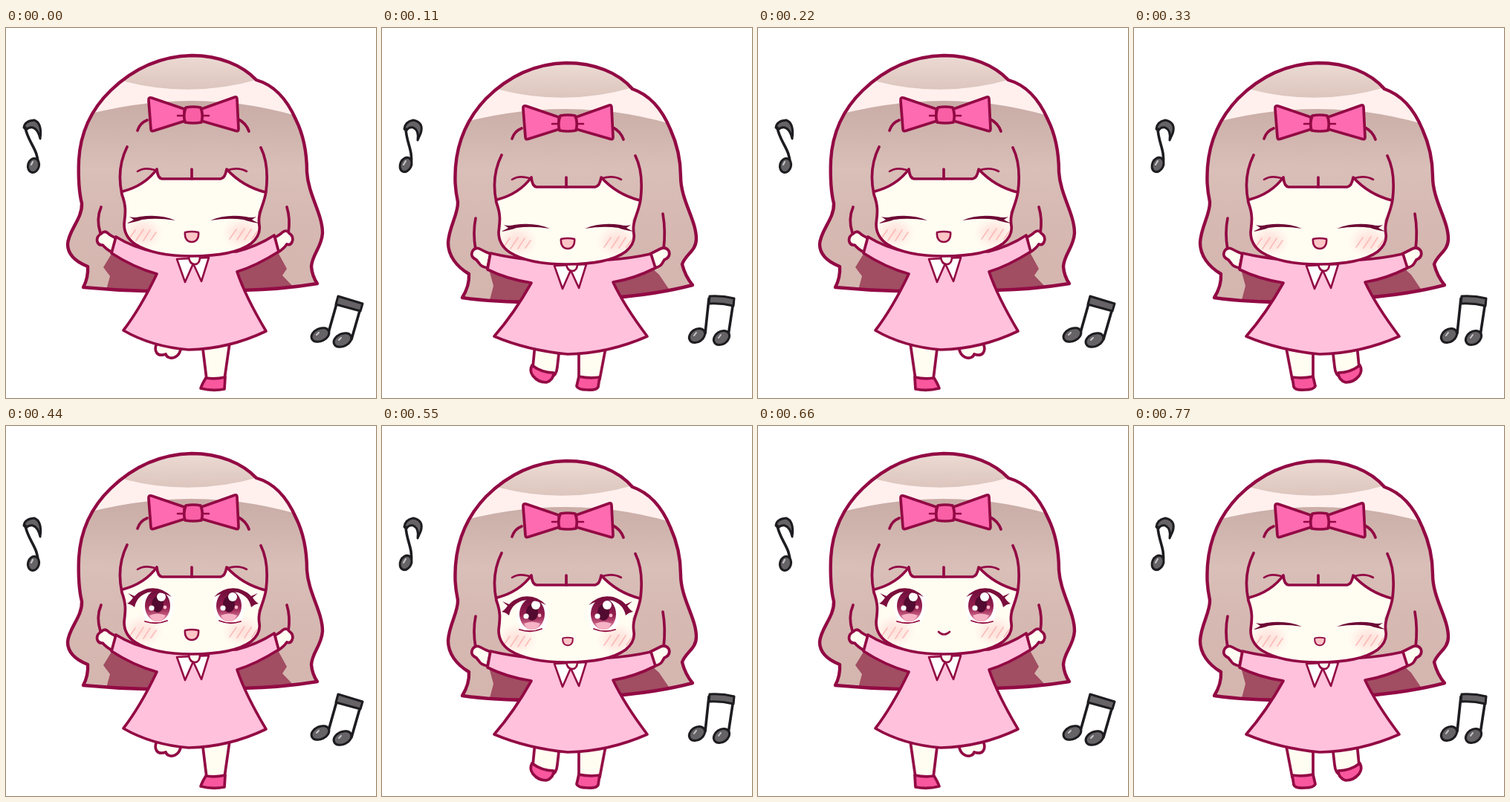
Write an HTML page that moves like this. It is 498x498 px and loops after 880 ms.

```html
<!DOCTYPE html>
<html lang="en">
<head>
<meta charset="utf-8">
<title>Dancing girl</title>
<style>
  html, body { margin: 0; width: 100%; height: 100%; overflow: hidden; background: #fff; }
  svg { display: block; width: 100%; height: 100%; }
  .line { fill: none; stroke: #920a44; stroke-width: 3.7; stroke-linecap: round; stroke-linejoin: round; }
  .outer { stroke-width: 4.4; }
  .thin { stroke-width: 2.6; }
  .skin { fill: #fffdf2; }
  .dress { fill: #ffc1dc; }
  .shoe { fill: #f9589e; }
  .bow { fill: #ff6bb0; }
  .shade { fill: #a14d62; }
  .note { fill: #666367; stroke: #1d1c20; stroke-width: 3; stroke-linecap: round; stroke-linejoin: round; }
  .note .stem { fill: none; stroke-width: 3.6; }
  .note .shine { fill: none; stroke: #c9c6c9; stroke-width: 2; }

  .up, .down { animation: beat 220ms step-end infinite; }
  .down { animation-delay: -110ms; }
  .legs { animation: swap 440ms step-end infinite; }
  .head { animation: bob 220ms step-end infinite; }
  .mouth { animation: mouth-bob 220ms step-end infinite; }
  .awake { animation: awake 880ms step-end infinite; }
  .asleep { animation: asleep 880ms step-end infinite; }
  .smile { animation: smile 880ms step-end infinite; }
  .laugh { fill: #ffc5c6; transform-origin: 250px 281px; animation: laugh 880ms step-end infinite; }

  @keyframes beat { 0% { opacity: 1 } 50%, 100% { opacity: 0 } }
  @keyframes bob { 0% { transform: none } 50%, 100% { transform: translate(-2px, 11px) } }
  @keyframes mouth-bob { 0% { transform: none } 50%, 100% { transform: translate(2px, -2px) } }
  @keyframes swap {
    0%, 75%, 100% { transform: none }
    25% { transform: translate(506px, 0) scaleX(-1) }
  }
  @keyframes awake { 0%, 87.5%, 100% { opacity: 0 } 50% { opacity: 1 } }
  @keyframes asleep { 0%, 87.5%, 100% { opacity: 1 } 50% { opacity: 0 } }
  @keyframes smile { 0%, 87.5%, 100% { opacity: 0 } 75% { opacity: 1 } }
  @keyframes laugh {
    0% { opacity: 1; transform: none }
    62.5%, 87.5%, 100% { opacity: 1; transform: scale(.75) }
    75% { opacity: 0; transform: scale(.75) }
  }
</style>
</head>
<body>
<svg viewBox="0 0 498 498">
  <defs>
    <linearGradient id="hair" gradientUnits="userSpaceOnUse" x1="0" y1="98" x2="0" y2="355">
      <stop offset="0" stop-color="#c8aca5"/><stop offset=".36" stop-color="#d9bfb8"/>
      <stop offset=".6" stop-color="#d6b9b2"/><stop offset="1" stop-color="#d4b6af"/>
    </linearGradient>
    <linearGradient id="crown" x2="0" y2="1">
      <stop offset="0" stop-color="#f1e2dd"/><stop offset=".45" stop-color="#e8d5ce"/><stop offset="1" stop-color="#dcc5bd"/>
    </linearGradient>
    <linearGradient id="iris" x2="0" y2="1">
      <stop offset="0" stop-color="#6d0d3b"/><stop offset=".55" stop-color="#96204f"/><stop offset="1" stop-color="#e78aa8"/>
    </linearGradient>
    <radialGradient id="blush">
      <stop offset="0" stop-color="#ffe0da"/><stop offset=".5" stop-color="#ffe8e1" stop-opacity=".8"/>
      <stop offset="1" stop-color="#fff1ea" stop-opacity="0"/>
    </radialGradient>

    <path id="hair-up" d="M104 349Q111 336 110 321C95 315 83 306 83 291C84 272 103 257 102 236C98 220 97 204 98 178C100 142 114 110 141 84C169 57 205 38 250 37C287 37 318 50 337 70C362 77 379 98 390 123C401 145 405 168 405 194C407 225 426 250 426 276C425 295 412 305 411 321Q412 334 419 344Q370 352 318 353L188 354Q146 353 104 349Z"/>
    <path id="hair-down" d="M108 363Q118 347 117 331C100 321 89 306 89 289C90 268 103 250 102 234C98 215 98 204 99 187C102 149 117 119 140 95C169 66 205 48 248 47C286 47 318 60 337 82C363 91 378 112 388 136C398 158 402 178 402 200C402 232 423 258 423 284C423 300 408 305 404 318Q408 334 418 346Q372 358 312 363L212 369Q150 369 108 363Z"/>
    <path id="face" d="M157 220Q187 212 203 190Q204 202 210 203H289Q295 202 297 190Q318 213 349 221Q345 236 339 248Q347 272 331 289Q305 308 250 307Q195 308 168 287Q157 270 160 243Z"/>
    <clipPath id="clip-up"><use href="#hair-up"/></clipPath>
    <clipPath id="clip-down"><use href="#hair-down"/></clipPath>
    <clipPath id="clip-face"><use href="#face"/></clipPath>

    <g id="bands">
      <path fill="#fff0ee" d="M90 122Q170 98 250 98T410 124V20H90Z"/>
      <path fill="url(#crown)" d="M160 72Q250 95 340 69L335 20H165Z"/>
    </g>

    <g id="collar" class="line thin">
      <path fill="#fff" d="M230 311L241 342L252 317L263 341L273 309Z"/>
      <path class="skin" d="M246 308Q247 318 254 318T261 308"/>
    </g>

    <g id="planted" class="line">
      <path class="skin" d="M264 424L270 473H294L301 424"/>
      <path class="shoe" d="M269 471Q281 473 295 470L294 486Q278 489 262 485Q264 479 269 471Z"/>
    </g>

    <g id="eye">
      <path d="M-20 -10Q-2 -26 20 -12Q22 8 17 21H-15Q-22 8-20-10Z" fill="#fff"/>
      <ellipse cy="1" rx="17" ry="21" fill="url(#iris)"/>
      <ellipse cy="-1" rx="8" ry="11" fill="#520a30"/>
      <path d="M-11 14Q0 9 11 14Q7 22 0 22T-11 14Z" fill="#f6b3c6"/>
      <circle cx="5" cy="-11" r="6" fill="#fff"/>
      <circle cx="-8" cy="4" r="3.6" fill="#fff"/>
      <circle cx="10" cy="3" r="2.4" fill="#f7b8cc"/>
    </g>
    <path id="lash" d="M-38 -16L-31 -10Q-35 -4 -39 -2Q-33 -1 -29 3Q-26 -12 -11 -17Q4 -20 21 -11Q7 -26 -12 -22Q-24 -18 -29 -12Z" fill="#7a0d3c"/>
    <path id="closed-lash" d="M-33 8Q-26 5 -23 3L-29 -1Q-22 1 -15 -1Q12 -5 33 4Q8 0 -12 3Q-20 6 -33 8Z" fill="#6d0a35"/>
    <path id="hatch" d="M-19 7L-10 -6M-9 8L1 -7M1 8L10 -6M11 7L18 -3" fill="none" stroke="#fbbdbb" stroke-width="1.7" stroke-linecap="round"/>
  </defs>

  <g class="up">
    <g clip-path="url(#clip-up)">
      <use href="#hair-up" fill="url(#hair)"/>
      <use href="#bands"/>
      <path class="shade" d="M142 304L131 322L140 334L134 356H190L206 328ZM366 302L378 324L372 333L392 354L320 358L306 328Z"/>
    </g>
    <use href="#hair-up" class="line outer"/>
    <path class="line" d="M128 241Q121 257 127 276M378 241Q383 257 380 276"/>
  </g>
  <g class="down">
    <g clip-path="url(#clip-down)">
      <use href="#hair-down" fill="url(#hair)"/>
      <use href="#bands" x="-2" y="11"/>
      <path class="shade" d="M144 325L150 347L143 374H208L204 338ZM362 322L373 332L392 360L310 372L304 338Z"/>
    </g>
    <use href="#hair-down" class="line outer"/>
    <path class="line" d="M126 256Q122 276 126 298M378 250Q382 273 379 298"/>
  </g>

  <g class="legs">
    <g class="up">
      <path class="line skin" d="M203 424C198 436 204 443 215 439C217 447 236 448 236 424"/>
      <use href="#planted"/>
    </g>
    <g class="down line">
      <path class="skin" d="M204 426L213 473H241V430M267 430L270 456Q271 468 279 470L303 457L300 426"/>
      <path class="shoe" d="M213 470Q227 472 241 469L244 482Q242 487 230 487Q217 488 215 483Z"/>
      <path class="shoe" d="M275 464Q291 464 304 454Q308 461 303 468Q296 477 285 477Q275 474 275 464Z"/>
    </g>
  </g>

  <g class="up">
    <g class="line">
      <path class="skin" d="M148 283Q140 279 137 276Q132 272 128 277Q121 281 123 288Q125 293 130 292Q135 298 143 302Z"/>
      <path class="skin" d="M362 282Q369 278 372 275Q378 271 381 276Q388 281 385 288Q383 293 378 291Q374 297 366 302Z"/>
      <path class="dress" d="M148 281Q172 296 200 301H310Q338 294 361 279L367 301Q337 320 311 328Q322 361 350 408Q300 432 246 433Q196 429 158 407Q181 377 203 331Q171 322 142 303Z"/>
    </g>
    <use href="#collar"/>
  </g>
  <g class="down">
    <g class="line">
      <path class="skin" d="M146 304Q138 301 133 298Q126 294 122 300Q118 308 127 312L131 317Q133 321 142 323Z"/>
      <path class="skin" d="M361 304Q369 300 375 297Q382 294 386 300Q389 308 380 312L377 317Q375 321 367 323Z"/>
      <path class="dress" d="M146 303Q171 309 200 312H306Q335 310 362 304L368 323Q338 338 311 342Q326 374 357 415Q305 438 250 439Q196 434 151 415Q178 384 201 343Q168 338 142 325Z"/>
    </g>
    <use href="#collar" x="2" y="9"/>
  </g>

  <g class="head">
    <use href="#face" class="skin"/>
    <g clip-path="url(#clip-face)">
      <ellipse cx="184" cy="276" rx="29" ry="23" fill="url(#blush)"/>
      <ellipse cx="318" cy="276" rx="29" ry="23" fill="url(#blush)"/>
    </g>
    <use href="#hatch" x="184" y="278"/>
    <use href="#hatch" x="320" y="277"/>

    <g class="line">
      <path d="M157 220Q187 212 203 190Q204 202 210 203H289Q295 202 297 190Q318 213 349 221"/>
      <path d="M163 160C154 178 151 201 156 224C163 243 160 252 159 264Q159 281 174 291Q199 307 250 307Q307 307 330 290Q343 279 341 266C338 249 347 240 350 220C353 195 351 177 343 161"/>
      <path d="M250 190V203"/>
      <path class="thin" d="M177 193Q186 187 200 191M299 191Q313 187 324 193"/>
      <path d="M190 124Q180 128 177 138M313 123Q323 128 327 139"/>
      <path class="bow" d="M240 109L196 94Q191 93 192 98L195 136Q195 140 200 138L241 125ZM263 109L308 93Q311 92 311 96L313 136Q313 140 308 138L263 125Z"/>
      <path class="bow" style="fill:#f95fa5" d="M242 107Q252 105 262 107Q266 117 263 127Q252 129 241 127Q238 117 242 107Z"/>
      <path class="thin" d="M231 118H239M273 118H265"/>
    </g>

    <g class="asleep">
      <use href="#closed-lash" x="195" y="255"/>
      <use href="#closed-lash" transform="translate(308 255) scale(-1 1)"/>
    </g>
    <g class="awake">
      <use href="#eye" x="204" y="241"/>
      <use href="#eye" x="300" y="241"/>
      <use href="#lash" x="202" y="241"/>
      <use href="#lash" transform="translate(301 241) scale(-1 1)"/>
      <path class="line" style="stroke-width:1.8" d="M187 263Q203 268 217 262M287 262Q301 268 316 263"/>
    </g>

    <g class="mouth line thin">
      <path class="laugh" d="M241 275Q250 273 259 275C260 283 256 288 250 288C244 288 240 283 241 275Z"/>
      <path class="smile" d="M243 277Q250 284 258 277"/>
    </g>
  </g>

  <g class="note up">
    <path d="M24 134Q25 125 38 124Q49 128 46 149Q43 136 36 134Q31 133 27 137Z"/>
    <path class="stem" d="M26 134C29 153 44 164 43 184"/>
    <ellipse cx="37" cy="185" rx="7.5" ry="9.5" transform="rotate(15 37 185)"/>
    <path class="shine" d="M34 184L36 180"/>
    <path class="stem" d="M434 410L447 364M465 419L478 374"/>
    <path d="M447 361L480 371L477 381L444 372Z"/>
    <ellipse cx="423" cy="413" rx="12.5" ry="8.5" transform="rotate(-25 423 413)"/>
    <ellipse cx="453" cy="420" rx="12.5" ry="8.5" transform="rotate(-25 453 420)"/>
    <path class="shine" d="M418 413L421 410M448 420L451 417"/>
  </g>
  <g class="note down">
    <path d="M30 136Q31 126 42 124Q57 127 52 142L48 151Q50 138 42 134Q36 133 33 138Z"/>
    <path class="stem" d="M32 136C33 155 42 165 39 184"/>
    <ellipse cx="32" cy="184" rx="7.5" ry="10" transform="rotate(25 32 184)"/>
    <path class="shine" d="M29 184L32 179"/>
    <path class="stem" d="M435 411L440 364M466 414L473 368"/>
    <path d="M441 361Q458 360 474 364L473 374Q456 370 440 371Z"/>
    <ellipse cx="424" cy="414" rx="11.5" ry="8.5" transform="rotate(-35 424 414)"/>
    <ellipse cx="457" cy="417" rx="11.5" ry="8.5" transform="rotate(-35 457 417)"/>
    <path class="shine" d="M420 414L423 410M453 417L456 413"/>
  </g>
</svg>
</body>
</html>
```
